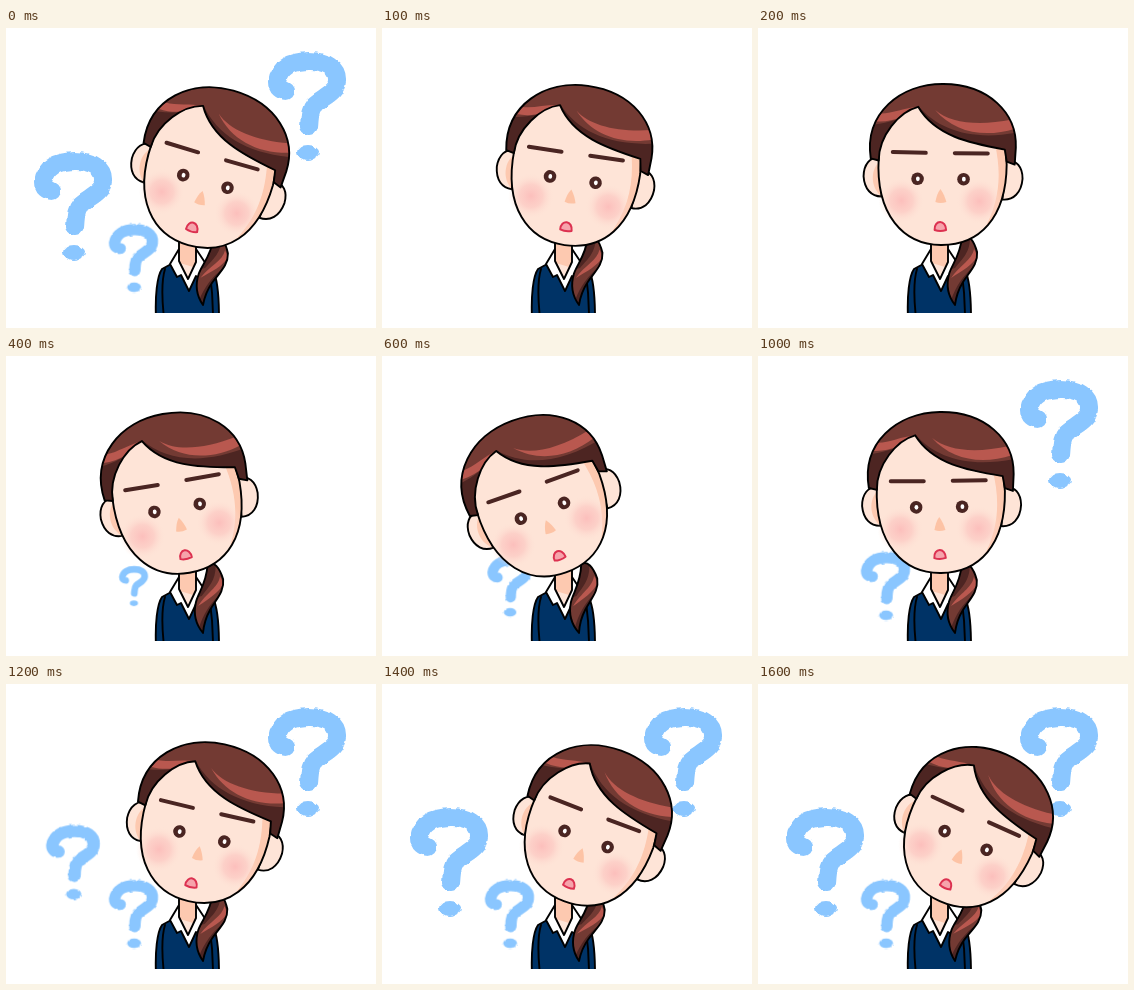
Animation, 370 px wide and 300 px high, one loop 2000 ms. Source, as an HTML page:

```html
<!DOCTYPE html>
<html lang="en">
<head>
<meta charset="utf-8">
<title>Puzzled woman</title>
<style>
@property --tilt { syntax: "<angle>"; inherits: true; initial-value: 0deg; }
html, body { margin: 0; width: 100%; height: 100%; overflow: hidden; background: #fff; }
svg { display: block; width: 370px; height: 300px; animation: tilt 2s step-end infinite; }
.line { stroke: #000; stroke-width: 1.9; stroke-linejoin: round; stroke-linecap: round; }
.skin { fill: #fee4d7; }
.shade { fill: #fdc9b0; }
.hair { fill: #733a33; }
.dark { fill: #4d2522; }
.shine { fill: #b9584f; }
#head { transform-origin: 182px 214px; transform: rotate(var(--tilt)) translateX(1px); }
#tail { transform-origin: 196px 277px; transform: rotate(calc(var(--tilt) * .2)); }
.pop { animation: 2s step-end infinite; }
#low { animation-name: low; }
#right { animation-name: right; }
#left { animation-name: left; }
@keyframes tilt {
  0% { --tilt: 16deg } 5% { --tilt: 8deg } 10% { --tilt: .5deg } 15% { --tilt: -5deg }
  20% { --tilt: -10deg } 25% { --tilt: -15deg } 30% { --tilt: -20deg } 35% { --tilt: -23.5deg }
  40% { --tilt: -19deg } 45% { --tilt: -9.5deg } 50% { --tilt: -.8deg } 55% { --tilt: 6deg }
  60% { --tilt: 12.7deg } 65% { --tilt: 17deg } 70% { --tilt: 20.5deg } 75% { --tilt: 22.5deg }
  80%, 100% { --tilt: 24deg }
}
@keyframes low {
  0% { transform: scale(1) } 5% { transform: scale(0) } 20% { transform: scale(.59) }
  25% { transform: scale(.75) } 30% { transform: scale(.9) } 35% { transform: scale(1.05) }
  40% { transform: scale(1.2) } 45%, 100% { transform: scale(1) }
}
@keyframes right {
  0% { transform: scale(1) } 5% { transform: scale(0) } 40% { transform: scale(.73) }
  45% { transform: scale(1.13) } 50%, 100% { transform: scale(1) }
}
@keyframes left {
  0% { transform: scale(1) } 5% { transform: scale(0) } 60% { transform: scale(.69) }
  65% { transform: scale(1.11) } 70%, 100% { transform: scale(1) }
}
</style>
</head>
<body>
<svg viewBox="0 0 370 300">
  <defs>
    <filter id="rough" filterUnits="userSpaceOnUse" x="-45" y="-60" width="90" height="120" color-interpolation-filters="sRGB">
      <feTurbulence type="fractalNoise" baseFrequency=".13" numOctaves="2" seed="4"/>
      <feDisplacementMap in="SourceGraphic" scale="4" xChannelSelector="R" yChannelSelector="G"/>
    </filter>
    <radialGradient id="blush">
      <stop offset="0" stop-color="#fcbfbc"/>
      <stop offset=".5" stop-color="#fcc8c2" stop-opacity=".7"/>
      <stop offset="1" stop-color="#fee4d7" stop-opacity="0"/>
    </radialGradient>
    <clipPath id="floor"><path d="M140 200H225V285H140Z"/></clipPath>
    <path id="faceShape" d="M119 130C116 188 145 217 182 217C220 217 247 190 247 136L245 110L158 70C130 76 116 108 119 130Z"/>
    <clipPath id="inFace"><use href="#faceShape"/></clipPath>
    <path id="hairShape" d="M111 131C104 86 140 56 183 56C228 56 257 84 256 119L255 136L247 133L245 121C210 115 175 108 158 79C139 84 119 108 119 133Z"/>
    <clipPath id="inHair"><use href="#hairShape"/></clipPath>
    <path id="tailShape" d="M204 209C210 204 216 213 219 224C220 236 212 243 205 254C200 262 198 269 197 277C190 268 188 257 191 246C194 236 202 228 204 209Z"/>
    <clipPath id="inTail"><use href="#tailShape"/></clipPath>
    <g id="mark" filter="url(#rough)">
      <path d="M-21-15C-26-15-30-18-30-24C-28-38-15-45 2-45S31-38 30-25S15-9 7-1C2 5 3 12 2 20" fill="none" stroke="#8ac6ff" stroke-width="18" stroke-linecap="round" stroke-linejoin="round"/>
      <ellipse cx="1" cy="46.500" rx="11" ry="7.500" fill="#8ac6ff"/>
    </g>
    <g id="eye">
      <circle r="6.3" fill="#4a2522"/>
      <ellipse cx=".3" rx="1.9" ry="2.4" fill="#fff"/>
    </g>
  </defs>

  <g transform="translate(301 78)"><use id="right" class="pop" href="#mark"/></g>
  <g transform="translate(67 178)"><use id="left" class="pop" href="#mark"/></g>
  <g transform="translate(127.5 230) scale(.63)"><use id="low" class="pop" href="#mark"/></g>

  <g clip-path="url(#floor)">
    <path class="line" fill="#003366" d="M150 290C149 268 151 248 156 241L167 235H198L207 242C212 252 213 270 213 290Z"/>
    <path class="line" fill="none" stroke-width="2.500" d="M159 241C155 254 156 272 158 290M204 246C206 260 207 272 207 290"/>
    <path class="line" fill="#fff" d="M173 221L164 236L171 249L175 247L183 263L190 248L194 250L200 236L190 221Z"/>
    <path class="skin" d="M173 210V233L182 251L190 234V210Z"/>
    <path class="shade" d="M173 212H190V234L187 239L174 235Z"/>
    <path class="line" fill="none" d="M173 212V233L182 251L190 234V212"/>
  </g>

  <g id="tail">
    <use href="#tailShape" class="hair"/>
    <g clip-path="url(#inTail)">
      <path class="dark" d="M200 205H212C213 224 205 230 197 240L190 242ZM214 240C205 248 198 258 193 272L199 280L212 256Z"/>
      <path class="shine" d="M216 221C214 232 202 237 193 250C204 243 215 237 219 228Z"/>
    </g>
    <use href="#tailShape" class="line" fill="none"/>
  </g>

  <g id="head">
    <path class="line skin" d="M121 131C110 128 104 138 104 149C105 162 112 169 122 169ZM246 133C257 130 263 139 263 150C262 164 254 172 243 171Z"/>
    <path class="shade" d="M119 135C111 143 111 159 121 168Z"/>
    <use href="#faceShape" class="skin"/>
    <path class="shade" clip-path="url(#inFace)" d="M235 115C242 145 241 172 224 203L252 180V115Z"/>
    <circle cx="142" cy="173" r="23" fill="url(#blush)"/>
    <circle cx="220" cy="173" r="23" fill="url(#blush)"/>
    <use href="#faceShape" class="line" fill="none"/>

    <use href="#hairShape" class="hair"/>
    <g clip-path="url(#inHair)">
      <path class="dark" d="M104 98C121 97 140 94 158 79L120 140H104ZM158 78C180 104 216 113 262 103V140H240L170 112Z"/>
      <path class="shine" d="M116 94C134 95 146 88 158 79C145 80 132 86 121 86ZM175 82C190 95 218 98 252 91L255 100C224 110 194 104 175 82Z"/>
    </g>
    <use href="#hairShape" class="line" fill="none"/>

    <path d="M133 124.500L166 125M195 125H228" stroke="#4a2522" stroke-width="4" stroke-linecap="round"/>
    <use href="#eye" x="158" y="151"/>
    <use href="#eye" x="204" y="151"/>
    <path fill="#fdc3a5" d="M181 161C184 165 186 170 187 174Q181 176 176 174C177 169 178 165 181 161Z"/>
    <path fill="#f6a3ab" stroke="#dc3150" stroke-width="2" stroke-linejoin="round" d="M175.500 202C175 197 178 194 181 194S187 197 187 202Q181 204 175.500 202Z"/>
  </g>
</svg>
</body>
</html>
```
